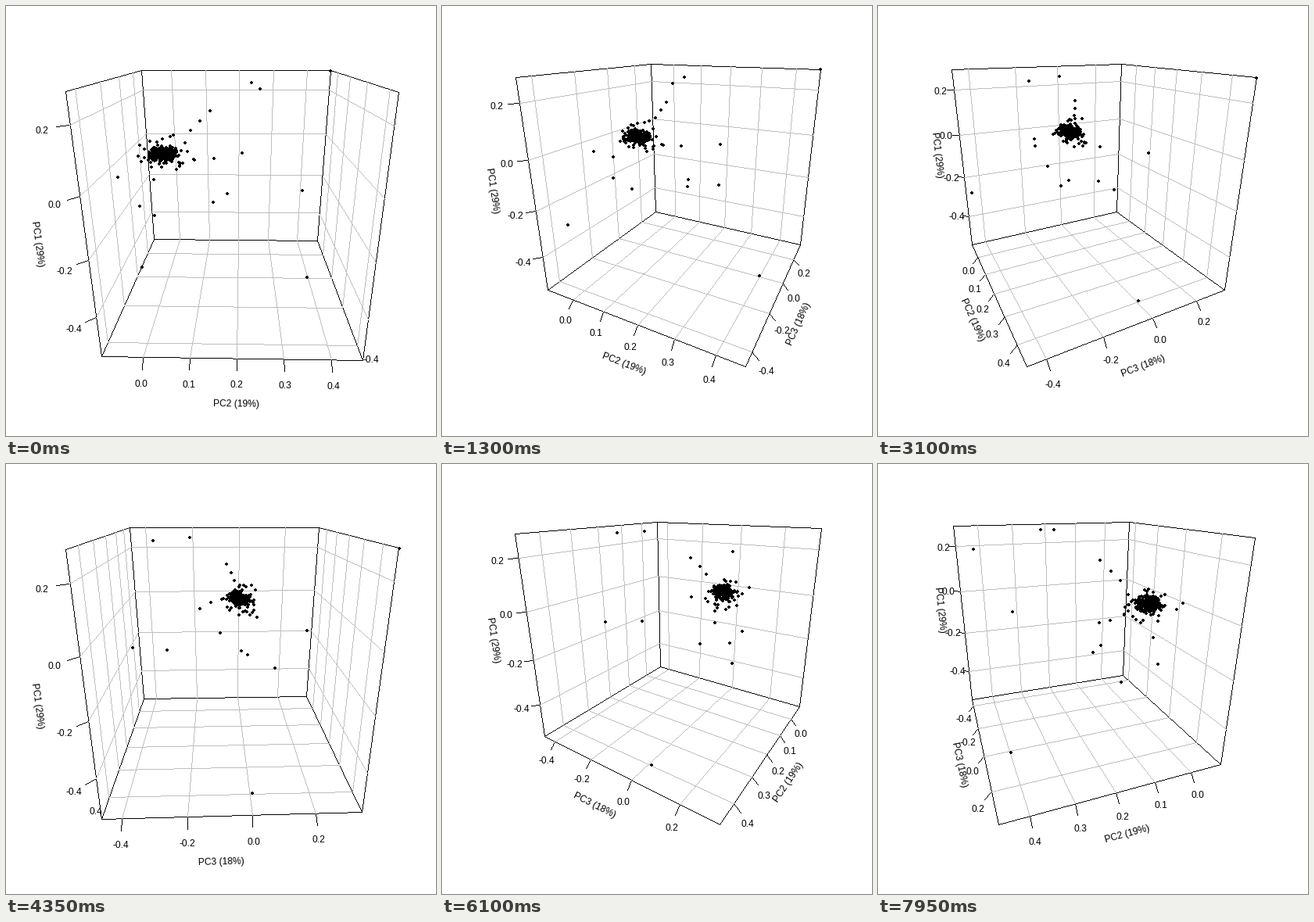
Animation of 550 by 550 pixels, one loop 8 s. Source, as a matplotlib script:

```python
import numpy as np
import matplotlib.pyplot as plt
from matplotlib.animation import FuncAnimation
from matplotlib.collections import PolyCollection

SIZE, DPI, FRAMES = 550, 100, 160
PX = 72 / DPI
PHI = np.radians(20)
DIST = 2 + np.sqrt(3)
TICK = 0.06
LEFT, RIGHT, TOP, BOTTOM = 59.04, 519.76, 59.04, 476.56
BLACK, GREY = 0, 190
plt.rcParams["font.family"] = "Liberation Sans"

# axis: title, tick values, scaled place of zero, scaled length of one unit
AXES = [
    ("PC2 (19%)", np.arange(5) * 0.1, -0.68, 3.6),
    ("PC3 (18%)", np.arange(-2, 2) * 0.2, 0.147, 2.473),
    ("PC1 (29%)", np.arange(-2, 2) * 0.2, 0.321, 2.383),
]
TICKS = [zero + unit * vals for _, vals, zero, unit in AXES]
SIGNS = (-1, 1)
CORNERS = np.array([(x, y, z) for x in SIGNS for y in SIGNS for z in SIGNS], float)


def make_cloud():
    """Dense core, loose halo, a curved arm and a few stray points."""
    rng = np.random.default_rng(7)
    mid = np.array([-.645, .14, .32])
    core = mid + np.clip(rng.normal(size=(200, 3)), -2, 2) * (.062, .055, .036)
    halo = mid + np.clip(rng.laplace(size=(75, 3)), -3, 3) * (.09, .07, .05)
    s = np.array([0, 1, 2, 5])
    u = .08 * s + .0048 * s**2
    arm = np.column_stack([u - .384, .065 - .3 * u - .83 * u**2, .55 + 1.1 * u - .47 * u**2])
    strays = [(1, 1, 1), (.19, -.6, .975), (.07, .69, .185), (-.2, .27, .24),
              (-.23, .47, -.29), (-.07, .18, -.085), (.54, -.495, .19), (.75, .17, -1),
              (-1, -.17, .19), (-.86, -.065, -.12), (-.63, -1, -.205),
              (-.785, .17, -.315), (-.665, -.28, .205)]
    return np.vstack([core, halo, arm, strays])


def project(p, theta):
    x, y, z = np.asarray(p, float).T
    side = x * np.cos(theta) + y * np.sin(theta)
    near = x * np.sin(theta) - y * np.cos(theta)
    up = z * np.cos(PHI) - near * np.sin(PHI)
    w = DIST - z * np.sin(PHI) - near * np.cos(PHI)
    return np.column_stack([side / w, up / w])


def make_view(theta):
    """Map box coordinates to stage pixels, fitting the box to the plot area."""
    flat = project(CORNERS, theta)
    lo, hi = flat.min(0), flat.max(0)
    area = np.array([RIGHT - LEFT, BOTTOM - TOP]) / 1.08
    scale = (area / (hi - lo)).min()
    centre = np.array([LEFT + RIGHT, TOP + BOTTOM]) / 2
    return lambda p: centre + (project(p, theta) - (lo + hi) / 2) * (scale, -scale)


def pick_axes(view):
    """Fixed coordinates of the three labelled edges: lowest two and leftmost."""
    base = CORNERS[CORNERS[:, 2] < 0]
    flat = view(base)
    low, left = base[flat[:, 1].argmax()], base[flat[:, 0].argmin()]
    return [(0, low[1], -1), (low[0], 0, -1), (left[0], left[1], 0)]


def on_edge(edge, axis, vals, out):
    p = np.tile(np.array(edge, float) * (1 + out), (len(vals), 1))
    p[:, axis] = vals
    return p


def wall(axis, sign):
    """Outline and grid segments of one face of the box."""
    a, b = [k for k in range(3) if k != axis]

    def point(u, v):
        p = [0, 0, 0]
        p[axis], p[a], p[b] = sign, u, v
        return p

    outline = [point(-1, -1), point(1, -1), point(1, 1), point(-1, 1)]
    grid = [(point(t, -1), point(t, 1)) for t in TICKS[a]]
    grid += [(point(-1, t), point(1, t)) for t in TICKS[b]]
    return outline, grid


def paint(layer, xy, shade):
    x, y = np.clip(xy, 0, SIZE - 1).astype(int).T
    layer[y, x] = (shade, shade, shade, 255)


def draw_line(layer, start, end, shade=BLACK):
    """Hard line, one pixel wide."""
    start, end = np.floor(start), np.floor(end)
    n = int(np.abs(end - start).max()) + 1
    paint(layer, np.round(np.linspace(start, end, n)), shade)


def draw_dots(layer, centres):
    for dx in range(-2, 2):
        for dy in range(-2, 2):
            if np.hypot(dx + .5, dy + .5) < 2:
                paint(layer, np.round(centres) + (dx, dy), BLACK)


def put(text, pos, angle=0.0):
    a = np.radians(angle)
    text.set_position(pos + 6 * np.array([np.sin(a), np.cos(a)]))
    text.set_rotation(angle)


def blank():
    return np.zeros((SIZE, SIZE, 4), np.uint8)


cloud = make_cloud()
fig = plt.figure(figsize=(SIZE / DPI, SIZE / DPI), dpi=DPI, facecolor="white")
ax = fig.add_axes([0, 0, 1, 1])


def add_layer(z):
    return ax.imshow(blank(), extent=(0, SIZE, SIZE, 0), interpolation="nearest",
                     aspect="auto", zorder=z)


def label(s):
    return ax.text(0, 0, s, fontsize=12 * PX, ha="center", va="baseline",
                   rotation_mode="anchor", zorder=1)


back, front = add_layer(1), add_layer(3)
panels = ax.add_collection(PolyCollection(
    [], facecolors="white", edgecolors="none", zorder=2), autolim=False)
titles = [label(a[0]) for a in AXES]
numbers = [[label(f"{v:.1f}") for v in a[1]] for a in AXES]
ax.set(xlim=(0, SIZE), ylim=(SIZE, 0))
ax.axis("off")


def update(i):
    theta = np.radians(i + 1)
    view = make_view(theta)
    eye = DIST * np.cos(PHI) * np.array([np.sin(theta), -np.cos(theta)])
    below, above = blank(), blank()

    for k, edge in enumerate(pick_axes(view)):
        t = TICKS[k]
        inner, outer, far = [view(on_edge(edge, k, t, n * TICK)) for n in range(3)]
        for p, q, text, pos in zip(inner, outer, numbers[k], far):
            draw_line(below, p, q)
            put(text, pos)
        dx, dy = inner[-1] - inner[0]
        angle = np.degrees(np.arctan2(-dy if dx > 0 else dy, abs(dx)))
        middle = on_edge(edge, k, [(t[0] + t[-1]) / 2], 3.5 * TICK)
        put(titles[k], view(middle)[0], angle)

    # only faces whose inner side is turned to the eye
    faces = [(2, -1)] + [(k, s) for k in (0, 1) for s in SIGNS if s * eye[k] < 1]
    outlines, grid = [], []
    for face in faces:
        outline, segs = wall(*face)
        outlines.append(view(outline))
        grid += [view(s) for s in segs]
    for outline in outlines:
        for p, q in zip(outline, np.roll(outline, -1, axis=0)):
            draw_line(above, p, q)
    for p, q in grid:
        draw_line(above, p, q, GREY)
    draw_dots(above, view(cloud))

    panels.set_verts(outlines)
    back.set_data(below)
    front.set_data(above)
    return []


anim = FuncAnimation(fig, update, frames=FRAMES, interval=50, repeat=True,
                     repeat_delay=0, blit=False)
plt.show()
```
